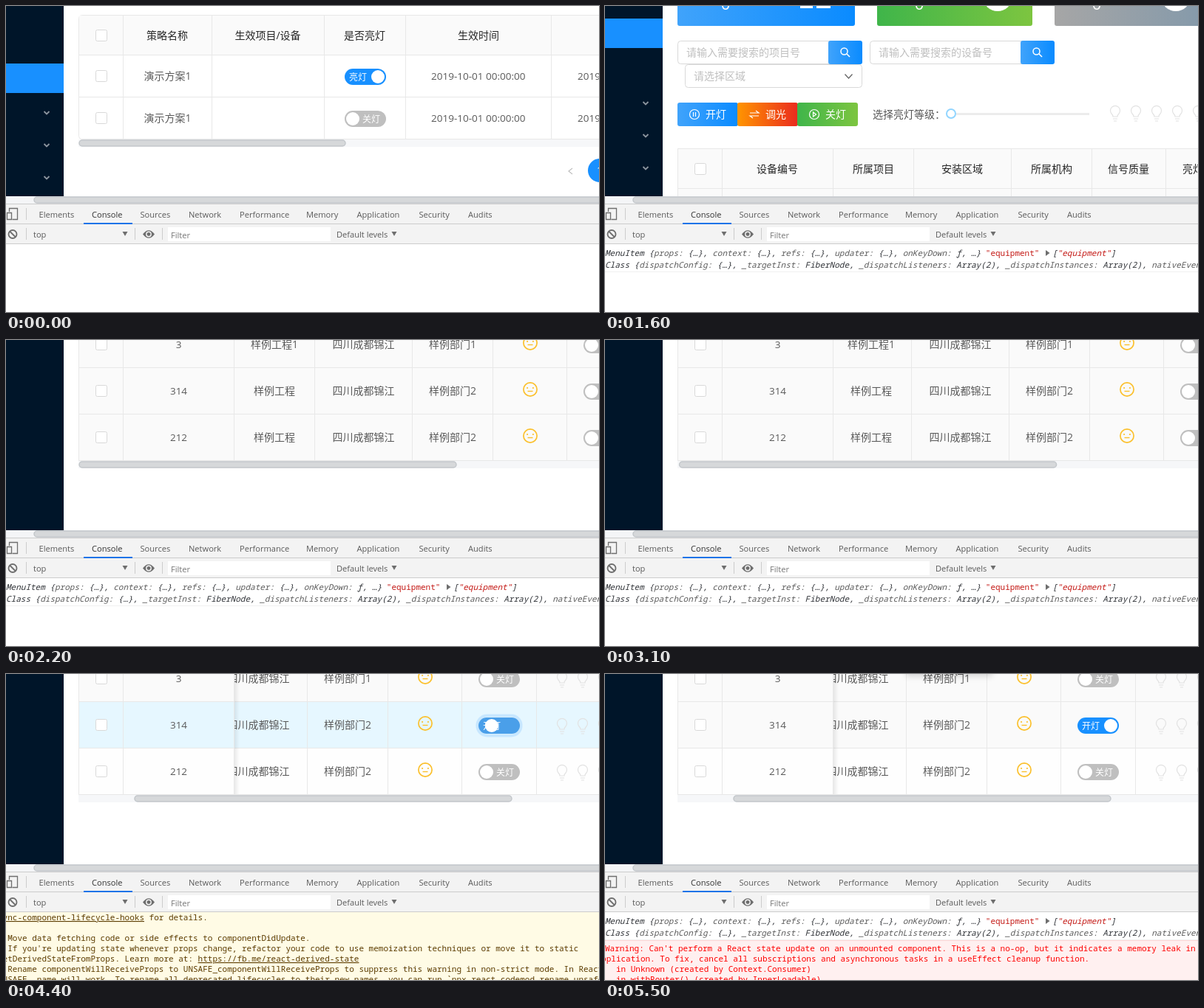
Write an HTML page that moves like this. It is 802x415 px and loops after 6300 ms.

```html
<!DOCTYPE html>
<html lang="zh-CN">
<head>
<meta charset="utf-8">
<style>
  html, body { margin: 0; width: 100%; height: 100%; overflow: hidden; background: #fff; }
  svg { display: block; font-family: 'Open Sans', 'Noto Sans CJK SC', 'Noto Sans CJK', sans-serif; }
  text { white-space: pre; }
  .tab { font-size: 11.1px; }
  .log { font: 11px 'Noto Sans Mono', monospace; }
  .i { font-style: italic; }
  .u { text-decoration: underline; }
</style>
</head>
<body>
<svg id="stage" width="802" height="415"></svg>
<script>
const LOOP = 6300, STEP = 100;
const BORDER = '#e8e8e8', BLUE = '#1890ff', INK = '#303338';
const $ = id => document.getElementById(id);

// Drawing helpers, each returning SVG markup
const rect = (x, y, w, h, fill, extra = '') =>
  `<rect x="${x}" y="${y}" width="${w}" height="${h}" fill="${fill}" ${extra}/>`;
const path = (d, stroke, width = 1, extra = '') =>
  `<path d="${d}" fill="none" stroke="${stroke}" stroke-width="${width}" ${extra}/>`;
const circle = (x, y, r, fill, extra = '') =>
  `<circle cx="${x}" cy="${y}" r="${r}" fill="${fill}" ${extra}/>`;
const text = (x, y, s, fill, extra = '', size = 14) =>
  `<text x="${x}" y="${y}" font-size="${size}" fill="${fill}" ${extra}>${s}</text>`;
const mid = (x, cy, s, fill = '#5a5a5a', size = 14, extra = '') =>
  text(x, cy + size * 0.36, s, fill, `text-anchor="middle" ${extra}`, size);
const head = (x, cy, s) => mid(x, cy, s, '#262626', 14, 'font-weight="500"');
const group = (id, body, extra = '') => `<g id="${id}" ${extra}>${body}</g>`;
const repeat = (n, f) => Array.from({ length: n }, (_, i) => f(i)).join('');
const vline = (x, y1, y2) => path(`M${x + .5} ${y1}V${y2}`, BORDER);
const hline = (y, x1, x2, c = BORDER) => path(`M${x1} ${y + .5}H${x2}`, c);
const gradient = (id, a, b) => `<linearGradient id="${id}"><stop stop-color="${a}"/><stop offset="1" stop-color="${b}"/></linearGradient>`;

const checkbox = cy => rect(121.5, cy - 7.5, 15, 15, '#fff', 'stroke="#d9d9d9" rx="2"');
const thumb = (x, y, w) => rect(x + 1, y + 1, w - 2, 8, '#d6d8da', 'rx="4" stroke="#c3c7cb" stroke-width="1.5"');
const chevron = (x, y) => path(`M${x - 3.5} ${y - 2}l3.5 3.5l3.5 -3.5`, '#8c959f', 1.8);

// p runs from 0 (off) to 1 (on)
function toggle(x, cy, p, label) {
  const moving = p > 0 && p < 1;
  const fill = p === 0 ? '#bfbfbf' : moving ? '#4a9fe9' : BLUE;
  return rect(x, cy - 11, 56, 22, fill, 'rx="11"') +
    mid(x + (p ? 18 : 36), cy + .5, label, '#fff', 12, 'font-weight="500"') +
    circle(x + 11 + 34 * p, cy, 9, '#fff');
}
const smiley = (x, y) => circle(x, y, 9.1, 'none', 'stroke="#fbc02d" stroke-width="1.7"') +
  circle(x - 3.9, y - 2, 1.1, '#fbc02d') + circle(x + 3.9, y - 2, 1.1, '#fbc02d') +
  path(`M${x - 3.5} ${y + 2.5}h7`, '#fbc02d', 1.4);
const bulb = (x, y) => path(`M${x - 3} ${y + 4}q0 -2 -2 -4a6.5 6.5 0 1 1 10 0q-2 2 -2 4zM${x - 3} ${y + 7}h6M${x - 2} ${y + 10}h4`, '#e2e2e2', 1.2);

function strategyPage() {
  const cols = [158, 278, 430, 540, 737];
  const row = (cy, on) => checkbox(cy) + mid(218.5, cy, '演示方案1') +
    toggle(458, cy + 1, on, on ? '亮灯' : '关灯') +
    text(575, cy + 5, '2019-10-01 00:00:00', '#5a5a5a', '', 13.5) +
    text(773, cy + 5, '2019-10-01 00:00:00', '#5a5a5a', '', 13.5);
  return rect(98.5, 12.5, 800, 168, '#fff', `rx="4" stroke="${BORDER}"`) +
    rect(99, 13, 703, 53, '#fafafa') + hline(66, 98, 802) + hline(123, 98, 802) +
    cols.map(x => vline(x, 12, 180)).join('') + checkbox(40) +
    head(218, 40, '策略名称') + head(354, 40, '生效项目/设备') + head(485, 40, '是否亮灯') + head(639, 40, '生效时间') +
    row(95, 1) + row(152, 0) +
    rect(98, 181, 704, 10, '#f6f7f9') + thumb(98, 181, 362) +
    path('M766 220l-5 4l5 4', '#bfbfbf', 1.2) + circle(803, 223, 16, BLUE) + mid(803, 223, '1', '#fff');
}

function searchBox(x, w, label) {
  const b = x + w - 46;
  return rect(x + .5, 60.5, w - 1, 31, '#fff', 'rx="4" stroke="#d9d9d9"') + text(x + 12, 81, label, '#bfbfbf') +
    rect(b, 60, 46, 32, 'url(#blue)', 'rx="3"') +
    circle(b + 21.5, 74.5, 4.5, 'none', 'stroke="#fff" stroke-width="1.5"') + path(`M${b + 25} 78l4 4`, '#fff', 1.6);
}

function equipmentTop() {
  const card = (x, w, fill, digitX) => rect(x, -60, w, 100, `url(#${fill})`, 'rx="3"') + mid(digitX, 10, '0', '#fff', 22);
  const button = (x, w, fill, label, icon) => rect(x, 144, w, 32, `url(#${fill})`, 'rx="3"') +
    path(icon, '#fff', 1.2) + text(x + 38, 165, label, '#fff', 'font-weight="500"');
  const ring = x => `M${x - 6.5} 160a6.5 6.5 0 1 1 13 0a6.5 6.5 0 1 1 -13 0`;
  return card(98, 240, 'blue', 163) + card(368, 210, 'green', 425) + card(608, 230, 'grey', 665) +
    rect(264, -4, 17, 20, '#fff') + rect(286, -4, 19, 20, '#fff') + circle(531, 0, 20, '#fff') + circle(772, 0, 20, '#fff') +
    searchBox(98, 250, '请输入需要搜索的项目号') + searchBox(358, 250, '请输入需要搜索的设备号') +
    rect(108.5, 92.5, 239, 31, '#fff', 'rx="4" stroke="#d9d9d9"') + text(120, 113, '请选择区域', '#bfbfbf') +
    path('M324.5 105.5l5 5.5l5 -5.5', '#666', 1.3) +
    button(98, 82, 'blue', '开灯', ring(121) + 'M119.5 157v6M122.5 157v6') +
    button(179, 82, 'orange', '调光', 'M196 158h12l-4 -3M208 162h-12l4 3') +
    button(260, 82, 'green', '关灯', ring(283) + 'M281.5 157l4 3l-4 3z') +
    text(362, 165, '选择亮灯等级：', '#555') + rect(475, 158, 180, 3, '#ececec') +
    circle(468, 159, 6, '#fff', 'stroke="#91d5ff" stroke-width="2"') + repeat(5, i => bulb(690 + 28 * i, 159));
}

function equipmentTable() {
  const rows = [['3', '样例工程1', '样例部门1'], ['314', '样例工程', '样例部门2'], ['212', '样例工程', '样例部门2']];
  const rowY = i => 260 + 63 * i;
  const lines = rows.map((_, i) => hline(rowY(i) + 63, 98, 1300)).join('') + hline(260, 98, 1300) + hline(206, 98, 1300);
  const wide = [417, 549, 658, 758, 859].map(x => vline(x, 206, 449)).join('') +
    [[363, '所属项目'], [483, '安装区域'], [604, '所属机构'], [708, '信号质量'], [809, '亮灯状态']]
      .map(([x, s]) => head(x, 234, s)).join('') +
    rows.map(([, project, unit], i) => {
      const cy = rowY(i) + 32;
      return mid(363, cy, project) + mid(483.5, cy, '四川成都锦江') + mid(604, cy, unit) + smiley(709, cy - 2) +
        (i === 1 ? group('live', '') : toggle(781, cy + 1, 0, '关灯')) + repeat(5, k => bulb(894 + 28 * k, cy + 2));
    }).join('');
  const fixed = rows.map(([no], i) => checkbox(rowY(i) + 32) + mid(233.5, rowY(i) + 32, no, '#5a5a5a', 13.5)).join('');
  return rect(98, 206, 704, 54, '#fafafa') +
    rows.map((_, i) => rect(98, rowY(i), 704, 63, '#fafafa', `id="row${i}"`)).join('') + lines +
    `<svg x="309" y="0" width="493" height="700" viewBox="309 0 493 700">${group('wide', wide)}</svg>` +
    rect(309, 206, 7, 243, 'url(#shade)', 'id="edge"') +
    vline(98, 206, 449) + vline(158, 206, 449) + vline(308, 206, 449) +
    checkbox(234) + head(233, 234, '设备编号') + fixed +
    rect(98, 450, 704, 10, '#f6f7f9') + group('bar', thumb(98, 450, 512));
}

function devtools() {
  const tabs = [[44.5, 'Elements'], [116, 'Console'], [181.5, 'Sources'], [247, 'Network'], [316, 'Performance'],
    [406, 'Memory'], [474.5, 'Application'], [558.5, 'Security'], [625, 'Audits']];
  const label = (x, y, s, c = '#5a5a5a') => `<text class="tab" x="${x}" y="${y}" fill="${c}">${s}</text>`;
  const arrow = x => `<path d="M${x - 3.5} 306h7l-3.5 6z" fill="#6e6e6e"/>`;
  const sep = (x, y) => path(`M${x + .5} ${y}v16`, '#ccc');
  return rect(0, 268, 802, 55, '#f3f3f3') + hline(268, 0, 802, '#ccc') + hline(295, 0, 802, '#ccc') + hline(322, 0, 802, '#ccc') +
    path('M4.500 279v-4.500h11v15h-7M1.500 280.500h6v9h-6z', '#6e6e6e', 1.3) + sep(27, 274) +
    tabs.map(([x, s]) => label(x, 287, s, s === 'Console' ? '#333' : '#5a5a5a')).join('') +
    rect(105, 294, 66, 2, '#1a73e8') +
    circle(9, 309.5, 5.5, 'none', 'stroke="#6e6e6e" stroke-width="1.8"') + path('M5 305.500l8 8', '#6e6e6e', 1.8) +
    sep(27, 301) + label(37, 314, 'top') + arrow(161) + sep(174, 301) +
    '<path d="M185 309.500q8 -10.500 16 0q-8 10.500 -16 0" fill="#6e6e6e"/>' +
    circle(193, 309.5, 3.2, '#6e6e6e', 'stroke="#f3f3f3" stroke-width="1.4"') + sep(211, 301) +
    rect(219, 300, 220, 19, '#fff') + label(223, 315, 'Filter', '#777') + label(447, 314, 'Default levels') + arrow(525);
}

function consoleLog() {
  const span = (s, c) => `<tspan fill="${c}">${s}</tspan>`;
  const line = (x, y, s, c, cls = '') => `<text class="log ${cls}" x="${x}" y="${y}" fill="${c}">${s}</text>`;
  // Property names are grey, everything else stays dark
  const keys = s => s.replace(/(\w+):/g, (m, k) => span(k + ':', '#5c5c5c'));
  const stack = ['Unknown (created by Context.Consumer)', 'withRouter() (created by InnerLoadable)', 'InnerLoadable (created by LoadableComponent)',
    'LoadableComponent (created by Context.Consumer)', 'Route (created by Main)', 'Switch (created by Main)', 'main (created by Basic)', 'Basic (created by Context.Consumer)'];
  const errors = ["  Warning: Can't perform a React state update on an unmounted component. This is a no-op, but it indicates a memory leak in your",
    'application. To fix, cancel all subscriptions and asynchronous tasks in a useEffect cleanup function.',
    ...stack.map(s => '    in ' + s)];
  const link = s => `<tspan class="u">${s}</tspan>`;
  const warnings = ['', '* Move code with side effects to componentDidMount, and set initial state in the constructor.',
    '* Rename componentWillMount to UNSAFE_componentWillMount to suppress this warning in non-strict mode.', '',
    'Warning: componentWillReceiveProps has been renamed, and is not recommended for use. See ' + link('https://fb.me/react-a'),
    link('sync-component-lifecycle-hooks') + ' for details.', '',
    '* Move data fetching code or side effects to componentDidUpdate.',
    "* If you're updating state whenever props change, refactor your code to use memoization techniques or move it to static",
    'getDerivedStateFromProps. Learn more at: ' + link('https://fb.me/react-derived-state'),
    '* Rename componentWillReceiveProps to UNSAFE_componentWillReceiveProps to suppress this warning in non-strict mode. In React 17.x,',
    'UNSAFE_ name will work. To rename all deprecated lifecycles to their new names, you can run `npx react-codemod rename-unsafe-lifecycles`'];
  const logs = line(0, 339, keys('MenuItem {props: {…}, context: {…}, refs: {…}, updater: {…}, onKeyDown: ƒ, …}'), INK, 'i') +
    line(514.8, 339, '"equipment"', '#c41a16') + '<path d="M596 331l5.500 4l-5.500 4z" fill="#6e6e6e"/>' +
    line(605, 339, '[' + span('"equipment"', '#c41a16') + ']', INK, 'i') +
    line(0, 355, keys('Class {dispatchConfig: {…}, _targetInst: FiberNode, _dispatchListeners: Array(2), _dispatchInstances: Array(2), nativeEvent: …}'), INK, 'i') +
    hline(360, 0, 802, '#f0f0f0');
  const alerts = rect(0, 361, 802, 148, '#fff0f0') + hline(361, 0, 802, '#ffd6d6') +
    errors.map((s, i) => line(i ? -11.5 : -13.2, 376 + 14 * i, s, '#f00')).join('') +
    rect(0, 509, 802, 200, '#fffbe5') + hline(509, 0, 802, '#fff5c2') +
    warnings.map((s, i) => line(-11, 524 + 14 * i, s, '#5c3c00')).join('');
  return `<svg y="323" width="802" height="92" viewBox="0 323 802 92">` +
    group('feed', group('logs', logs) + group('alerts', alerts)) + '</svg>';
}

$('stage').innerHTML = '<defs>' + gradient('blue', '#40a3fb', '#0a8bff') + gradient('green', '#3fb54a', '#7dc540') +
  gradient('grey', '#a6a6a6', '#8098ab') + gradient('orange', '#ff9500', '#ea2a1f') +
  '<linearGradient id="shade"><stop stop-opacity=".08"/><stop offset="1" stop-opacity="0"/></linearGradient>' +
  '<filter id="soft" x="-30%" y="-50%" width="160%" height="200%"><feDropShadow dx="0" dy="3" stdDeviation="4" flood-opacity=".16"/></filter></defs>' +
  rect(0, 0, 802, 415, '#fff') +
  '<svg width="802" height="258">' + rect(0, 0, 78, 258, '#001529') +
  group('page', rect(0, 78, 78, 40, BLUE, 'id="selected"') + repeat(3, i => chevron(55, 145 + 44 * i)) +
    group('strategy', strategyPage()) + group('equipment', equipmentTop() + equipmentTable())) +
  group('toast', rect(407, -40, 117, 40, '#fff', 'rx="4" filter="url(#soft)"')) + '</svg>' +
  rect(0, 258, 802, 10, '#f4f5f7') + thumb(37, 258, 800) +
  group('status', rect(-4.5, 247.5, 131, 22, '#fff', 'rx="3" stroke="#d0d0d0"') +
    text(120, 262, 'localhost:3000/equipment', '#6a6a6a', 'text-anchor="end"', 11.3)) +
  devtools() + consoleLog();

// Linear interpolation through [time, value] keys
function at(t, keys) {
  const n = keys.findIndex(k => k[0] > t);
  if (n === 0) return keys[0][1];
  if (n < 0) return keys[keys.length - 1][1];
  const [t0, a] = keys[n - 1], [t1, b] = keys[n];
  return a + (b - a) * (t - t0) / (t1 - t0);
}
const show = (id, on) => $(id).style.display = on ? '' : 'none';
const move = (id, x, y) => $(id).setAttribute('transform', `translate(${x} ${y})`);
const paint = (id, color) => $(id).setAttribute('fill', color);

function render(t) {
  const equipment = t >= 900;
  const scrollY = at(t, [[1500, 0], [1600, 13], [1700, 75], [1800, 142], [1900, 199], [2000, 250], [2100, 286]]);
  const scrollX = at(t, [[3000, 0], [3100, 3], [3200, 28], [3300, 75], [3400, 122], [3500, 142]]);
  const on = at(t, [[4300, 0], [4400, .2], [4500, 1]]);
  const halo = at(t, [[4300, 0], [4400, .15], [4800, 0]]);
  const hover = at(t, [[3600, 0], [3900, 1], [4700, 1], [4900, 0]]);

  show('strategy', !equipment);
  show('equipment', equipment);
  $('selected').setAttribute('y', equipment ? 30 : 78);
  show('status', t >= 800 && t < 1500);
  move('page', 0, -scrollY);
  move('wide', -scrollX, 0);
  move('bar', scrollX * .528, 0);
  $('edge').setAttribute('opacity', at(t, [[3100, 0], [3400, 1]]));

  paint('row1', `rgb(${250 - 20 * hover},${250 - 3 * hover},${250 + 5 * hover})`);
  paint('row2', t >= 3700 ? '#fefefe' : '#fafafa');
  $('live').innerHTML =
    rect(779.5, 342.5, 59, 27, 'none', `rx="13" stroke="${BLUE}" stroke-width="4" stroke-opacity="${halo}"`) +
    toggle(781, 356, on, on ? '开灯' : '关灯');
  show('toast', t >= 4500);
  move('toast', 0, at(t, [[4500, -16], [4900, 0]]));

  show('logs', t >= 800);
  show('alerts', t >= 4400);
  move('feed', 0, t < 4400 ? 0 : -at(t, [[5100, 260], [5200, 205], [5300, 125], [5400, 50], [5500, 0]]));
}

function tick() {
  render(Math.floor(performance.now() % LOOP / STEP) * STEP);
  requestAnimationFrame(tick);
}
tick();
</script>
</body>
</html>
```
